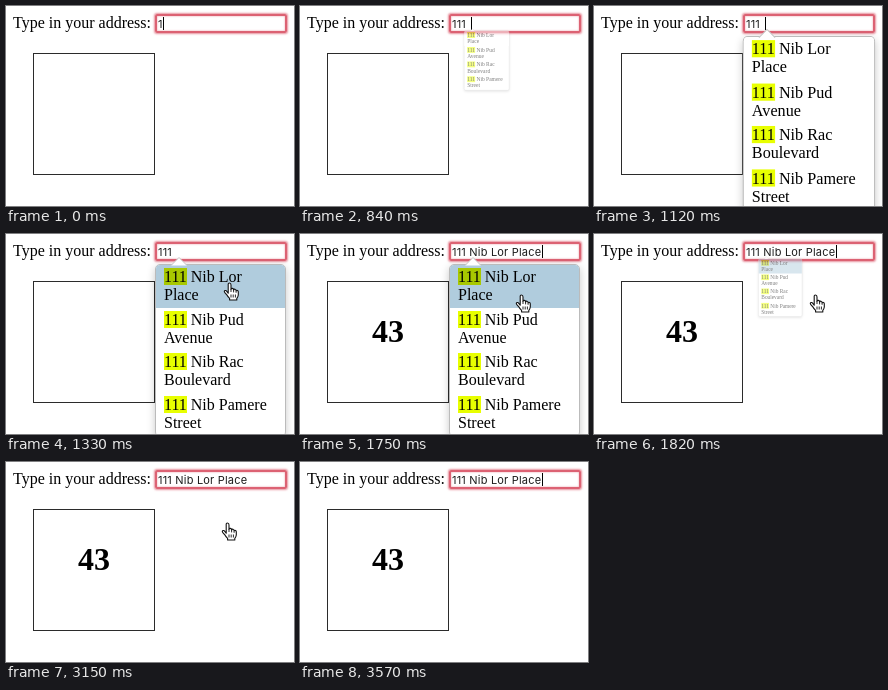
Write an HTML page that moves like this. It is 288 by 200 pixels and loops after 3.85 s.

```html
<!DOCTYPE html>
<html lang="en">
<head>
<meta charset="utf-8">
<title>Address suggestions</title>
<style>
  html, body { margin: 0; width: 100%; height: 100%; overflow: hidden; background: #fff; }
  body { position: relative; font: 16px/18px "Liberation Serif", "Times New Roman", serif; color: #000; }
  body > * { position: absolute; box-sizing: border-box; }
  .label { left: 7px; top: 8px; white-space: nowrap; }
  .field {
    left: 149px; top: 8px; width: 132px; height: 19px;
    border: 2px solid #dc6273; border-radius: 2px;
    box-shadow: 0 0 2px 1px rgba(214, 72, 92, .6), inset 0 0 2px rgba(214, 72, 92, .6);
  }
  .typed {
    left: 152px; top: 11px; height: 14px; overflow: hidden; white-space: nowrap;
    font: 11px/14px Inter, "Liberation Sans", sans-serif; letter-spacing: .2px; color: #1c1c1c;
  }
  .caret { left: 0; top: 11px; width: 1px; height: 13px; background: #000; }
  .box { left: 27px; top: 47px; width: 122px; height: 122px; border: 1px solid #2b2b2b; }
  .count { left: 72px; top: 79px; font-size: 32px; line-height: 36px; font-weight: bold; }

  .menu {
    left: 149px; top: 30px; width: 131px; height: 173px;
    background: #fff; border: 1px solid #bbb; border-radius: 5px;
    box-shadow: 0 3px 8px rgba(0, 0, 0, .22);
    transform-origin: 23px -8px;
  }
  .item { height: 42.5px; padding: 3.25px 8px; box-sizing: border-box; white-space: nowrap; }
  .item:first-child { border-radius: 4px 4px 0 0; }
  mark { background: #e8ff00; color: #000; }
  .arrow { position: absolute; left: 14px; top: -9px; }
  .hand { left: 214.5px; top: 60px; }

  /* every change is held on a 70 ms beat */
  .typed, .caret, .count, .menu, .hand, .item:first-child, .item:first-child mark {
    animation: 3850ms step-end infinite;
  }
  .typed { animation-name: type; }
  .caret { animation-name: step, blink; }
  .count { animation-name: count; }
  .menu { animation-name: pop; }
  .hand { animation-name: point; }
  .item:first-child { animation-name: hover; }
  .item:first-child mark { animation-name: hover-mark; }

  @keyframes type {
    0% { width: 5px; }
    3.63% { width: 10.4px; }
    9.09% { width: 15.8px; }
    20% { width: 18px; }
    45.45%, 100% { width: 100px; }
  }
  @keyframes step {
    0% { transform: translateX(157px); }
    3.63% { transform: translateX(162px); }
    9.09% { transform: translateX(168px); }
    20% { transform: translateX(171px); }
    45.45%, 100% { transform: translateX(242px); }
  }
  @keyframes blink {
    0%, 43.63%, 69.09%, 92.72%, 100% { opacity: 1; }
    32.72%, 58.18%, 81.81% { opacity: 0; }
  }
  @keyframes count {
    0% { opacity: 0; }
    45.45%, 100% { opacity: 1; }
  }
  @keyframes pop {
    0% { transform: scale(.3); opacity: 0; }
    21.81% { transform: scale(.345); opacity: .5; }
    23.63% { transform: scale(.78); opacity: .9; }
    25.45% { transform: scale(1.07); opacity: 1; }
    27.27% { transform: scale(1.04); opacity: 1; }
    29.09% { transform: scale(1.01); opacity: 1; }
    30.9% { transform: none; opacity: 1; }
    47.27% { transform: scale(.335); opacity: .5; }
    49.09% { transform: scale(.3); opacity: .25; }
    50.9%, 100% { transform: scale(.3); opacity: 0; }
  }
  @keyframes point {
    0% { transform: translate(24px, 12px); opacity: 0; }
    30.9% { transform: translate(18px, 2px); opacity: 1; }
    32.72% { transform: translate(7px, -8px); opacity: 1; }
    34.54% { transform: translate(2px, -12px); opacity: 1; }
    36.36% { transform: translate(1px, -9px); opacity: 1; }
    38.18% { transform: translate(1px, -6px); opacity: 1; }
    40% { transform: translate(0, -3px); opacity: 1; }
    41.81% { transform: translate(0, -1px); opacity: 1; }
    43.63% { transform: none; opacity: 1; }
    83.63%, 100% { transform: none; opacity: 0; }
  }
  @keyframes hover {
    0% { background: #fff; }
    30.9%, 100% { background: #b0ccdd; }
  }
  @keyframes hover-mark {
    0% { background: #e8ff00; }
    30.9%, 100% { background: #a8c800; }
  }
</style>
</head>
<body>
  <div class="label">Type in your address:</div>
  <div class="field"></div>
  <div class="typed">111 Nib Lor Place</div>
  <div class="caret"></div>
  <div class="box"></div>
  <div class="count">43</div>

  <div class="menu">
    <div class="item"><mark>111</mark> Nib Lor<br>Place</div>
    <div class="item"><mark>111</mark> Nib Pud<br>Avenue</div>
    <div class="item"><mark>111</mark> Nib Rac<br>Boulevard</div>
    <div class="item"><mark>111</mark> Nib Pamere<br>Street</div>
    <svg class="arrow" width="18" height="10">
      <path d="M1 9.5 9 1.5 17 9.5" fill="#fff" stroke="#c4c4c4"/>
    </svg>
  </div>

  <svg class="hand" width="17" height="19" viewBox="0 0 17 19">
    <path d="M5.2 11.2V3.2Q5 1 6.5 1T8 3V7.4Q8.3 6.3 9.4 6.4T10.6 8Q11 7 12 7.2T13.1 8.8Q13.6 8 14.5 8.4T15.3 10V13Q15 15 13.8 16.3V18H6.6V16.4Q4.6 14.6 3.6 12.6L1.6 10.3Q.9 9 2 8.6T4 9.6Z"
      fill="#fff" stroke="#111" stroke-width="1.1" stroke-linejoin="round"/>
    <path d="M8 7.4V10M10.6 8V10.4M13.1 8.8V10.8M8 12.5V15.5M10.2 12.5V15.5M12.4 12.5V15.5" fill="none" stroke="#111" stroke-width=".9"/>
  </svg>
</body>
</html>
```
